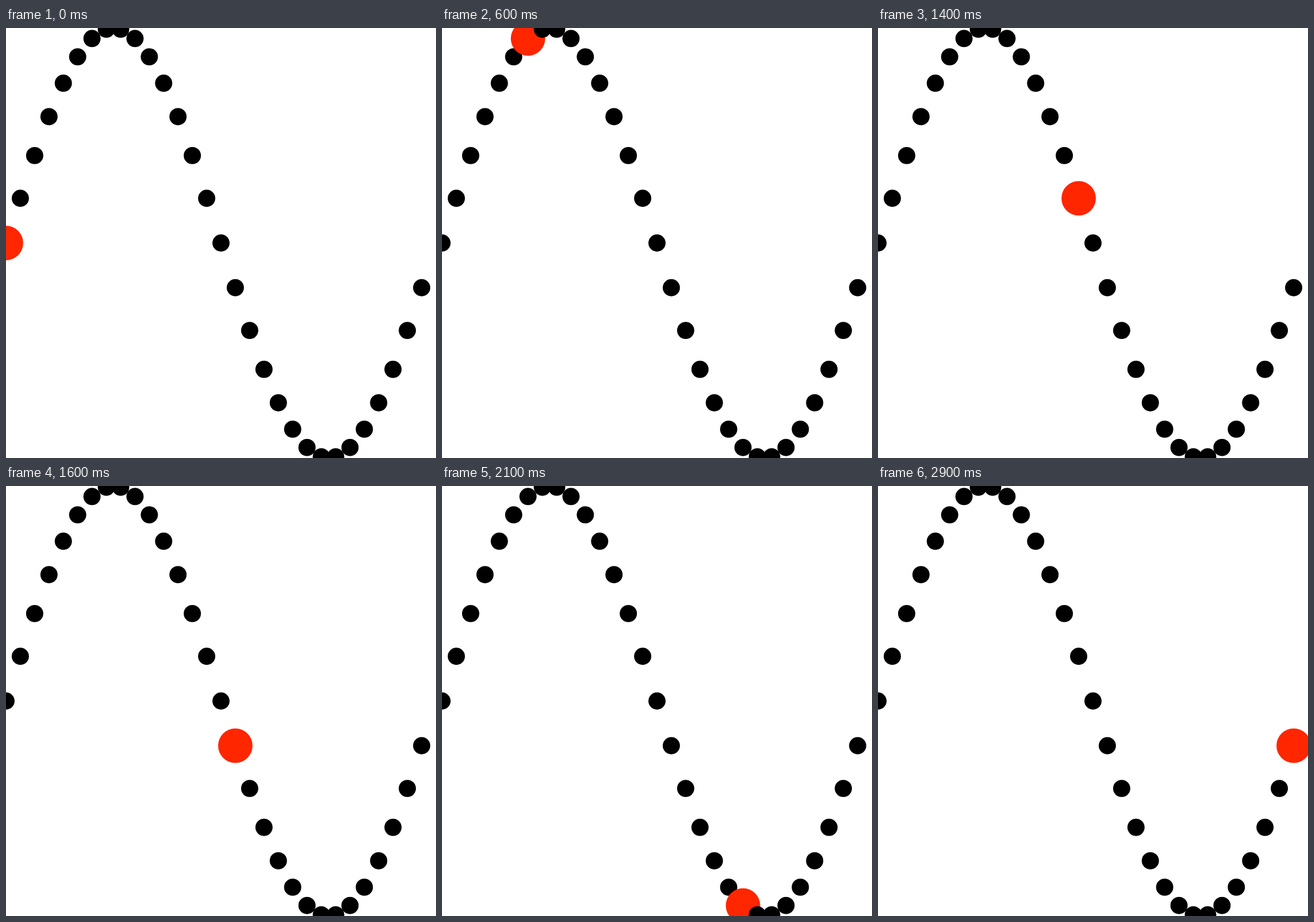
These frames come from a looping animation (748 by 748 pixels, 3000 ms). An HTML page:

```html
<!DOCTYPE html>
<html lang="en">
<head>
<meta charset="utf-8">
<title>Sine dots</title>
<style>
  html, body {
    margin: 0;
    width: 100%;
    height: 100%;
    overflow: hidden;
    background: #fff;
  }
  svg {
    display: block;
    width: 748px;
    height: 748px;
  }
  circle {
    r: 14.96px;
    fill: #000;
    animation: hit 3s step-end infinite;
  }
  /* each dot is lit for one thirtieth of the loop */
  @keyframes hit {
    0% { r: 29.92px; fill: #ff2600; }
    3.3333%, 100% { r: 14.96px; fill: #000; }
  }
</style>
</head>
<body>
<svg id="stage" viewBox="0 0 748 748"></svg>
<script>
  const SIZE = 748, COUNT = 30, STEP = 100;
  const stage = document.getElementById('stage');

  for (let i = 0; i < COUNT; i++) {
    const dot = document.createElementNS('http://www.w3.org/2000/svg', 'circle');
    const u = i / COUNT;
    dot.setAttribute('cx', SIZE * u);
    dot.setAttribute('cy', SIZE / 2 * (1 - Math.sin(2 * Math.PI * u)));
    dot.style.animationDelay = `${i * STEP}ms`;
    stage.append(dot);
  }
</script>
</body>
</html>
```
